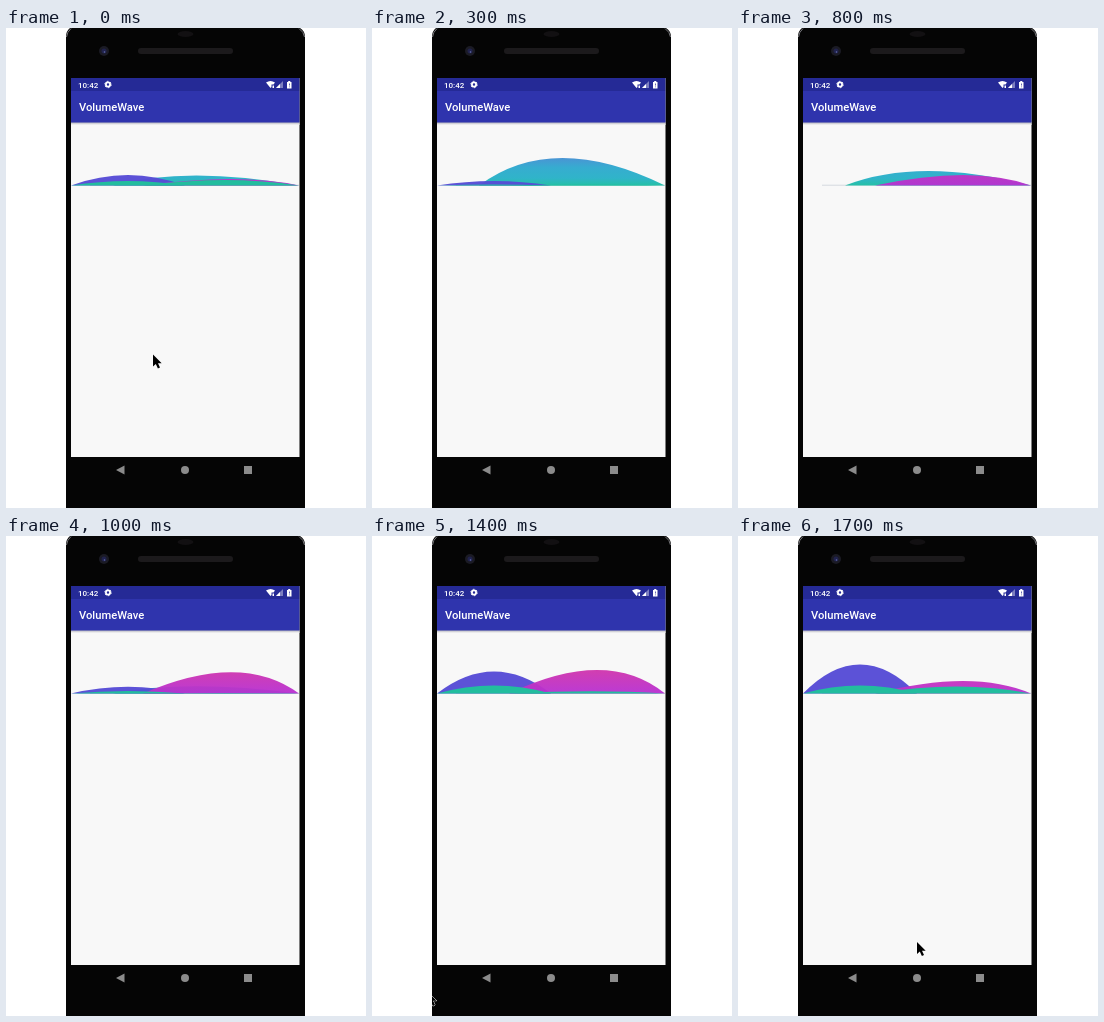
Recreate the animation shown at these times as an HTML page. Size 360 px wide and 480 px high, loop 1800 ms.

```html
<!DOCTYPE html>
<html lang="en">
<head>
<meta charset="utf-8">
<title>VolumeWave</title>
<style>
  html, body { margin: 0; width: 100%; height: 100%; overflow: hidden; background: #fff; }
  svg { display: block; width: 360px; height: 480px; }
  text { font-family: Roboto, sans-serif; font-weight: 500; fill: #fff; }
</style>
</head>
<body>
<svg viewBox="0 0 360 480">
  <defs>
    <linearGradient id="cyan" gradientUnits="userSpaceOnUse" x1="0" y1="130" x2="0" y2="157">
      <stop offset="0" stop-color="#4a94d4"/>
      <stop offset=".35" stop-color="#36acd0"/>
      <stop offset=".75" stop-color="#30b4c9"/>
      <stop offset="1" stop-color="#26c0a8"/>
    </linearGradient>
    <linearGradient id="pink" gradientUnits="userSpaceOnUse" x1="0" y1="126" x2="0" y2="157">
      <stop offset="0" stop-color="#d8369f"/>
      <stop offset="1" stop-color="#b830d2"/>
    </linearGradient>
    <linearGradient id="shade" x2="0" y2="1">
      <stop offset="0" stop-color="#aaaab4"/>
      <stop offset="1" stop-color="#f8f8f8"/>
    </linearGradient>
    <clipPath id="phone"><path d="M60 0H299V480H60Z"/></clipPath>
  </defs>

  <!-- phone -->
  <path d="M60 480V9Q60 3 64 0H294Q299 3 299 9V480Z" fill="#050505"/>
  <path d="M60.5 9Q61 4 65 .5M298.5 9Q298 4 293 .5" fill="none" stroke="#77777b"/>
  <ellipse cx="179.500" cy="6" rx="8" ry="3" fill="#121012"/>
  <rect x="132" y="20" width="95" height="6" rx="3" fill="#1c1a1c"/>
  <circle cx="98" cy="23" r="5" fill="#1b1b24"/>
  <circle cx="98" cy="23" r="2.500" fill="#20224c"/>
  <circle cx="98.500" cy="24" r=".8" fill="#6670b0"/>

  <!-- screen -->
  <rect x="65" y="50" width="228.500" height="379" fill="#f8f8f8"/>
  <rect x="65" y="94" width="228.500" height="3" fill="url(#shade)"/>
  <rect x="65" y="63" width="228.500" height="31.500" fill="#2f34ad"/>
  <rect x="65" y="50" width="228.500" height="13" fill="#252a96"/>
  <text x="72" y="59.500" font-size="8">10:42</text>
  <text x="73" y="83" font-size="11.200">VolumeWave</text>
  <g fill="none" stroke="#fff">
    <circle cx="102" cy="56.500" r="2.100" stroke-width="1.800"/>
    <circle cx="102" cy="56.500" r="3.200" stroke-width="1" stroke-dasharray="1.700 1.650"/>
  </g>
  <g fill="#fff">
    <path d="M260 54.500Q264.500 51.500 269 54.500L267.500 56.500H265.500V59L264.500 60Z"/>
    <path d="M266.500 57.500h1.500v2.500h-1.500z"/>
    <path d="M270 60L277 53V60Z" opacity=".4"/>
    <path d="M270 60L274 56V60Z"/>
    <path d="M281 54h1.200v-1h2.100v1h1.200v6.500h-4.500z"/>
    <path d="M283 55.500h.7v2h-.7zM283 58.500h.7v.8h-.7z" fill="#252a96"/>
  </g>
  <g fill="#8b8b8b">
    <path d="M110 442L118.500 437.500V446.500Z"/>
    <circle cx="179" cy="442" r="4"/>
    <path d="M238 438h8v8h-8z"/>
  </g>

  <path d="M84 157.200H293" stroke="#ccd2da" stroke-width=".8"/>
  <g id="waves"></g>
  <g clip-path="url(#phone)">
    <path id="cursor" d="M0 0V12L2.800 9.500L4.900 14L7 13L5 8.700H8.700Z" stroke="#fff" stroke-width="1" paint-order="stroke"/>
  </g>
</svg>
<script>
const BASE = 157.5, LOOP = 1800, STEP = 100;
const TIMES = [0, 300, 500, 800, 1200, 1400, 1700];

// Each wave is one quadratic arch: left end, control x, right end, peak heights at TIMES.
const waves = [
  { fill: 'url(#cyan)', x: [107, 181, 293], peaks: [10, 27.5, 26.5, 14.5, 0, 0, 0] },
  { fill: '#574dd6', x: [65, 122, 179], peaks: [10.5, 4.5, 2, 0, 13.5, 22, 29], opacity: .97 },
  { fill: 'url(#pink)', x: [137, 235, 293], peaks: [6.5, 0, 0, 10.5, 32, 23.5, 12.5], opacity: .95 },
  { fill: '#22bd9e', x: [65, 122, 179], peaks: [4.5, 1, 0, 0, 5, 8, 8] },
  { fill: '#22bd9e', x: [137, 222, 293], peaks: [5.5, 1, 1, 0, .8, 2.2, 7] },
];
const cursorOut = { times: [0, 200], x: [147, 63], y: [326.5, 430] };
const cursorIn = { times: [1400, 1500, 1600, 1700], x: [56, 101, 146, 179], y: [456, 440, 421, 406] };

const cursor = document.getElementById('cursor');
const group = document.getElementById('waves');
for (const wave of waves) {
  wave.path = document.createElementNS(group.namespaceURI, 'path');
  wave.path.setAttribute('fill', wave.fill);
  wave.path.setAttribute('opacity', wave.opacity ?? 1);
  group.append(wave.path);
}

function sample(times, values, t) {
  const i = times.findIndex(time => time >= t);
  if (i < 0) return values.at(-1);
  if (i === 0) return values[0];
  const k = (t - times[i - 1]) / (times[i] - times[i - 1]);
  return values[i - 1] + (values[i] - values[i - 1]) * k;
}

function draw() {
  const t = Math.floor(performance.now() % LOOP / STEP) * STEP;

  for (const { path, x: [left, mid, right], peaks } of waves) {
    const peak = sample(TIMES, peaks, t);
    path.setAttribute('d', peak ? `M${left} ${BASE}Q${mid} ${BASE - 2 * peak} ${right} ${BASE}Z` : '');
  }

  const move = t <= 200 ? cursorOut : cursorIn;
  cursor.setAttribute('visibility', t <= 200 || t >= 1400 ? 'visible' : 'hidden');
  cursor.setAttribute('transform',
    `translate(${sample(move.times, move.x, t)} ${sample(move.times, move.y, t)})`);
  requestAnimationFrame(draw);
}
draw();
</script>
</body>
</html>
```
